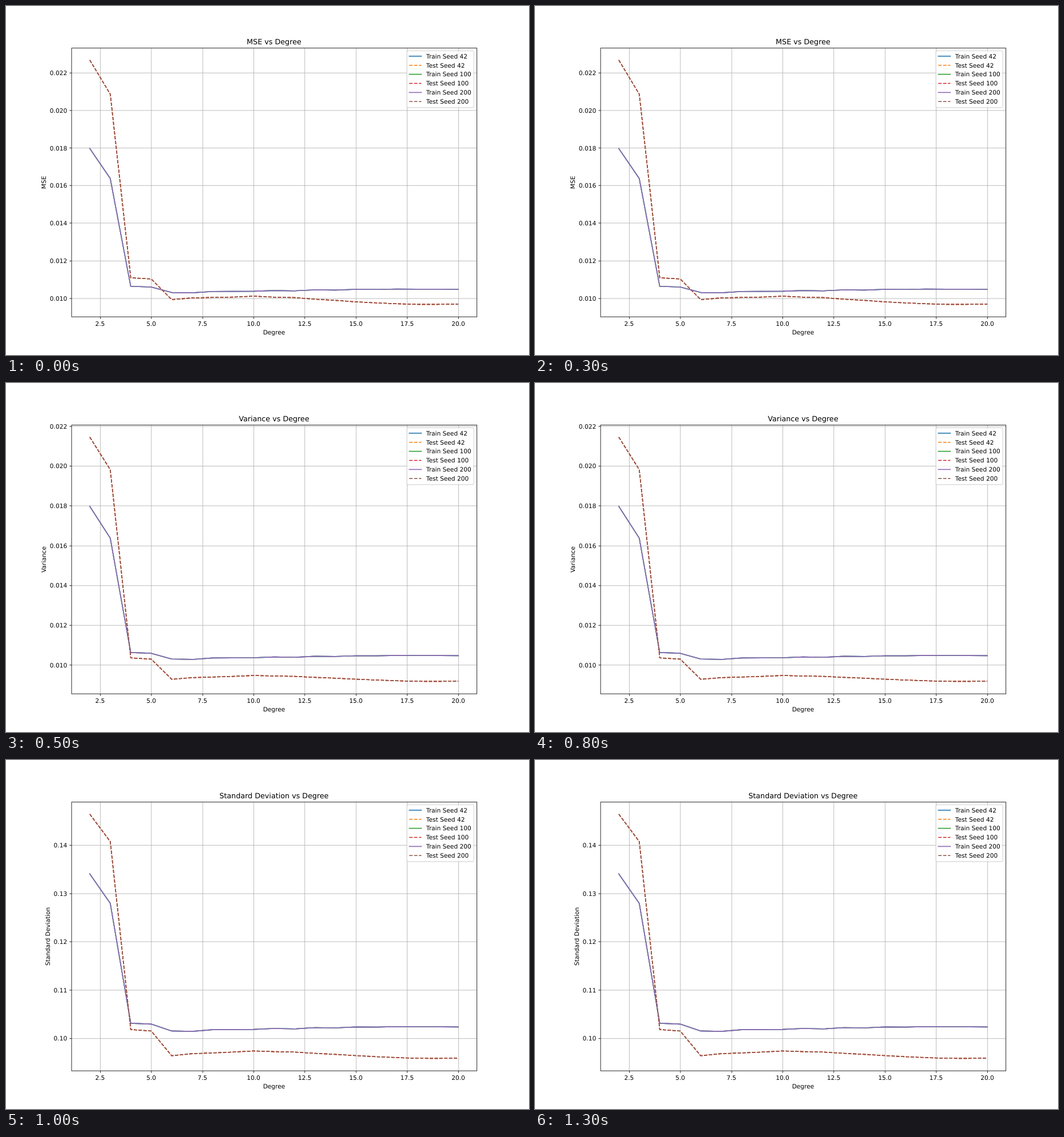
Write an HTML page that moves like this. It is 917 px wide and 611 px high and loops after 1500 ms.

```html
<!DOCTYPE html>
<html lang="en">
<head>
<meta charset="utf-8">
<title>Error by degree</title>
<style>
  html, body { margin: 0; width: 100%; height: 100%; overflow: hidden; background: #fff; }
  svg { display: block; width: 917px; height: 611px; }
  text { font: 13.889px "DejaVu Sans", sans-serif; text-rendering: geometricPrecision; }
  .title { font-size: 16.667px; }
  .mid { text-anchor: middle; }
  .end { text-anchor: end; }
  .grid, .axis { fill: none; stroke: #b0b0b0; stroke-width: 1.11; }
  .axis { stroke: #000; }
  .line { fill: none; stroke-width: 2.083; stroke-linejoin: round; stroke-linecap: square; }
  .dash { stroke-dasharray: 7.708 3.333; stroke-linecap: butt; }
</style>
</head>
<body>
<svg id="stage" viewBox="0 0 1200 800" preserveAspectRatio="none"></svg>
<script>
const HOLD = 500;
const box = { l: 150, r: 1080, t: 96, b: 712 };
const colors = ['#1f77b4', '#ff7f0e', '#2ca02c', '#d62728', '#9467bd', '#8c564b'];
const labels = [42, 100, 200].flatMap(s => [`Train Seed ${s}`, `Test Seed ${s}`]);

// Values for degrees 2 to 20, in millionths
const scale = list => list.map(v => v / 1e6);
const train = scale([17970, 16370, 10626, 10590, 10298, 10281, 10354, 10359, 10365, 10403,
  10387, 10439, 10427, 10467, 10461, 10482, 10478, 10476, 10469]);
const testMse = scale([22680, 20865, 11080, 11020, 9920, 10010, 10035, 10055, 10104, 10050,
  10028, 9942, 9880, 9800, 9745, 9698, 9665, 9667, 9681]);
const testVar = scale([21446, 19808, 10358, 10297, 9283, 9366, 9396, 9430, 9475, 9447,
  9430, 9379, 9338, 9287, 9244, 9209, 9180, 9177, 9186]);
const root = list => list.map(Math.sqrt);

const charts = [
  { name: 'MSE', train, test: testMse, step: 0.002, digits: 3, labelX: 92 },
  { name: 'Variance', train, test: testVar, step: 0.002, digits: 3, labelX: 92 },
  { name: 'Standard Deviation', train: root(train), test: root(testVar), step: 0.01, digits: 2, labelX: 100.8 }
];

const snap = v => Math.floor(v + 0.5) + 0.5;
const toX = d => box.l + (box.r - box.l) * (1 + (d - 2) / 18 * 20) / 22;

function add(parent, tag, attrs, text) {
  const el = document.createElementNS('http://www.w3.org/2000/svg', tag);
  for (const key in attrs) el.setAttribute(key, attrs[key]);
  if (text) el.textContent = text;
  return parent.appendChild(el);
}

const lineClass = i => i % 2 ? 'line dash' : 'line';

function drawLegend(g) {
  add(g, 'rect', { x: 919.7, y: 102.9, width: 153.4, height: 130, rx: 2.8,
    fill: '#fff', stroke: '#ccc', 'stroke-width': 1.39, opacity: 0.8 });
  labels.forEach((label, i) => {
    const y = 115 + i * 20.8;
    add(g, 'path', { class: lineClass(i), stroke: colors[i], d: `M925.3 ${y}h27.78` });
    add(g, 'text', { x: 964.2, y: y + 5 }, label);
  });
}

function drawChart(svg, c) {
  const g = add(svg, 'g', {});
  const all = [...c.train, ...c.test];
  const lo = Math.min(...all), hi = Math.max(...all);
  const toY = v => box.b - (box.b - box.t) * (1 + (v - lo) / (hi - lo) * 20) / 22;
  const pad = (hi - lo) / 20;
  let grid = '', ticks = '';

  for (let d = 2.5; d <= 20; d += 2.5) {
    const x = snap(toX(d));
    grid += `M${x} ${box.t}V${box.b}`;
    ticks += `M${x} ${box.b + 0.5}v4.86`;
    add(g, 'text', { class: 'mid', x: toX(d), y: 733 }, d.toFixed(1));
  }
  for (let n = Math.ceil((lo - pad) / c.step); n * c.step <= hi + pad; n++) {
    const v = n * c.step, y = snap(toY(v));
    grid += `M${box.l} ${y}H${box.r}`;
    ticks += `M${box.l + 0.5} ${y}h-4.86`;
    add(g, 'text', { class: 'end', x: 140.3, y: toY(v) + 5.4 }, v.toFixed(c.digits));
  }

  add(g, 'path', { class: 'grid', d: grid });
  colors.forEach((stroke, i) => {
    const points = (i % 2 ? c.test : c.train).map((v, k) => `${toX(k + 2)},${toY(v)}`).join(' ');
    add(g, 'polyline', { class: lineClass(i), stroke, points });
  });
  add(g, 'path', { class: 'axis', d: ticks });
  add(g, 'rect', { class: 'axis', x: box.l + 0.5, y: box.t + 0.5,
    width: box.r - box.l, height: box.b - box.t });

  add(g, 'text', { class: 'mid title', x: 615, y: 87.7 }, `${c.name} vs Degree`);
  add(g, 'text', { class: 'mid', x: 615, y: 752.3 }, 'Degree');
  add(g, 'text', { class: 'mid', transform: `translate(${c.labelX} 404.5) rotate(-90)` }, c.name);
  drawLegend(g);
  return g;
}

const stage = document.getElementById('stage');
const views = charts.map(c => drawChart(stage, c));

function show(now) {
  const current = Math.floor(now / HOLD) % views.length;
  views.forEach((g, i) => g.setAttribute('visibility', i === current ? 'visible' : 'hidden'));
}

const total = HOLD * views.length;
show(0);
views.forEach((g, i) => {
  const at = k => k / views.length;
  const frames = views.map((_, k) => ({
    offset: at(k), visibility: k === i ? 'visible' : 'hidden', easing: 'step-end'
  }));
  frames.push({ offset: 1, visibility: i === 0 ? 'visible' : 'hidden' });
  g.animate(frames, { duration: total, iterations: Infinity });
});
</script>
</body>
</html>
```
